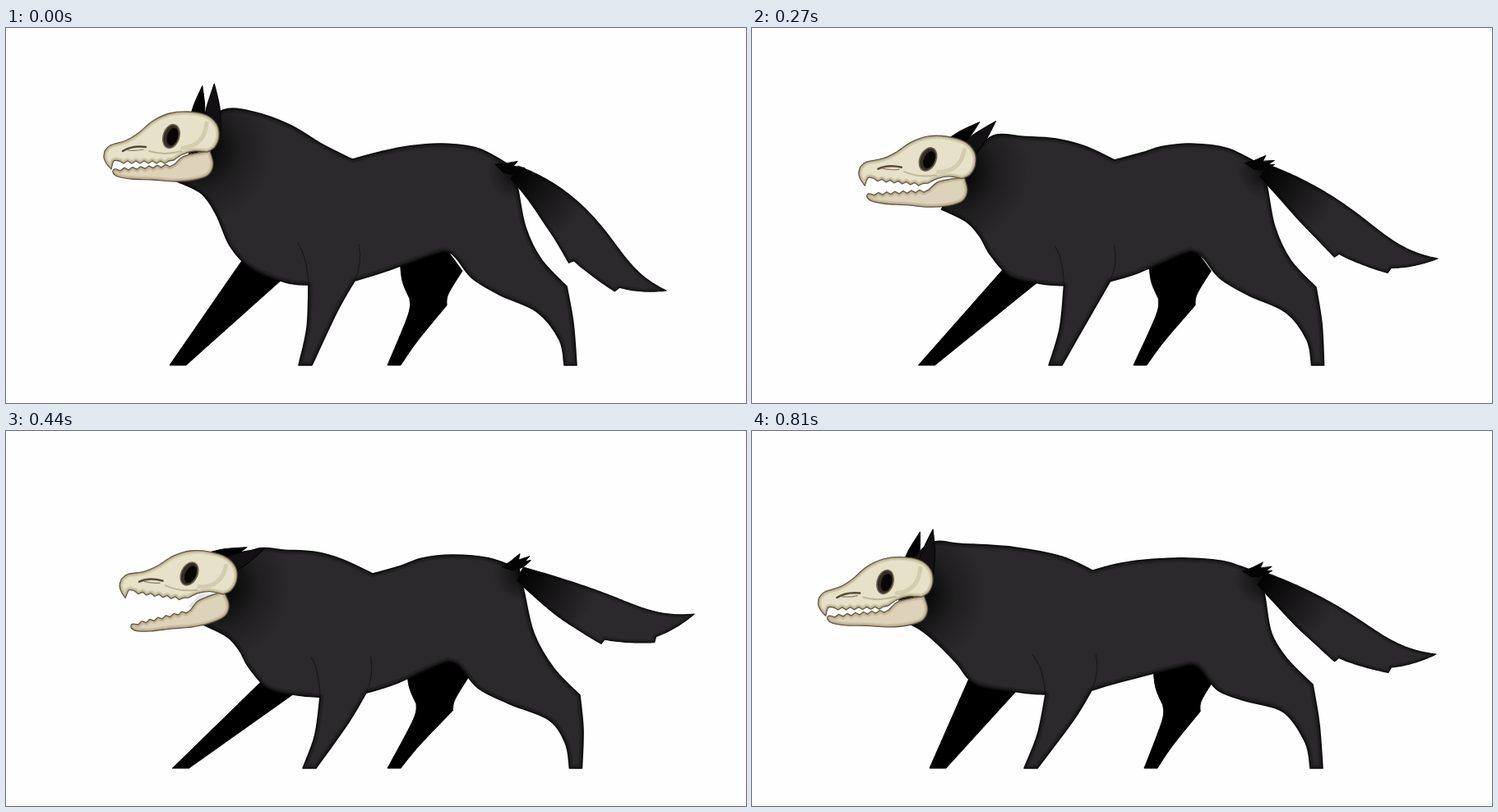
Recreate the animation shown at these times as an HTML page with a canvas. Size 900x457 px, loop 0.97 s.

```html
<!DOCTYPE html>
<html lang="en">
<head>
<meta charset="utf-8">
<title>Skull wolf walking</title>
<style>
  html, body { margin: 0; width: 100%; height: 100%; overflow: hidden; background: #fefefe; }
  canvas { display: block; width: 100vw; height: 100vh; }
</style>
</head>
<body>
<canvas id="stage" width="900" height="457"></canvas>
<script>
const ctx = document.getElementById('stage').getContext('2d');
const FUR = '#2b292b', INK = '#121012', CLEAR = 'rgba(0,0,0,0)';
const RAD = Math.PI / 180;

// Key poses. Pairs are offsets from the standing shape; angles are in degrees.
const rest = {
  until: 170, head: [0, 0], tilt: 0, jaw: 0, ear: -87, neck: [0, 0], withers: [0, 0],
  step: 0, hip: 0, hock: [0, 0], rump: [0, 0], tip: [0, 0]
};
const poses = [
  rest,
  { until: 340, head: [13, 28], tilt: 6, jaw: -5, ear: -46, neck: [30, 31], withers: [20, 1],
    step: 5, hip: 0, hock: [4, 1], rump: [4, -2], tip: [31, -39] },
  { until: 510, head: [22, 42], tilt: 8, jaw: -17, ear: -25, neck: [40, 44], withers: [25, 14],
    step: 5, hip: 10, hock: [16, 7], rump: [7, -2], tip: [34, -97] },
  { until: 680, head: [30, 38], tilt: 12, jaw: -21, ear: -14, neck: [50, 47], withers: [31, 16],
    step: 5, hip: 12, hock: [20, 11], rump: [14, 8], tip: [48, -92] },
  { until: 810, head: [-54, 44], tilt: -5, jaw: 0, ear: -56, neck: [-46, 28], withers: [-7, 10],
    step: -25, hip: 14, hock: [0, -6], rump: [-4, -2], tip: [55, -117] },
  { until: 970, head: [-39, 52], tilt: -1, jaw: 0, ear: -79, neck: [-46, 36], withers: [-7, 10],
    step: -25, hip: 14, hock: [0, -6], rump: [1, 4], tip: [29, -48] }
];

const bodyShape = `235,125 264,100 300,102 345,118 385,142 421,160
  | 455,151 490,144 530,141 575,147 617,170
  | 623,198 632,243 651,282 682,315 | 690,360 694,411 | 679,411
  | 673,380 646,346 600,325 567,305 548,281 537,273 522,275 460,297 424,308
  | 403,345 372,411 | 356,411 | 366,365 368,313
  | 340,310 296,291 272,265 256,228 238,202 208,187`;

// Bends the standing shape: every point follows the nearby joints of the pose.
function makeWarp({ neck, withers, step, hip, hock, rump }) {
  const elbow = [withers[0] / 2 + step * 0.3, withers[1] * 0.8];
  const mix = i => elbow[i] * 0.65 + neck[i] * 0.35;
  const joints = [
    [266, 100, ...neck],
    [225, 190, neck[0] * 0.75, neck[1] * 1.1],
    [285, 283, mix(0), mix(1)],
    [421, 160, ...withers],
    [368, 313, ...elbow],
    [424, 308, ...elbow],
    [364, 411, step, 0],
    [545, 141, hock[0] * 0.8, hip],
    [537, 273, hock[0] * 0.4, hip * 0.85],
    [617, 170, ...rump],
    [682, 315, ...hock],
    [686, 411, hock[0] * 0.4, 0]
  ];
  return ([x, y]) => {
    let total = 0, dx = 0, dy = 0;
    for (const [jx, jy, moveX, moveY] of joints) {
      const weight = ((x - jx) ** 2 + (y - jy) ** 2 + 4) ** -1.6;
      total += weight;
      dx += weight * moveX;
      dy += weight * moveY;
    }
    return [x + dx / total, y + dy / total];
  };
}

const points = text => text.trim().split(/\s+/).map(pair => pair.split(',').map(Number));

// Joins points by a smooth curve; "|" marks a corner.
function outline(text, place = point => point) {
  const path = new Path2D();
  let last;
  for (const part of text.split('|')) {
    const run = points(part).map(place);
    if (last) run.unshift(last);
    else path.moveTo(...run[0]);
    for (let i = 0; i < run.length - 1; i++) {
      const b = run[i], c = run[i + 1], a = run[i - 1] || b, d = run[i + 2] || c;
      path.bezierCurveTo(b[0] + (c[0] - a[0]) / 6, b[1] + (c[1] - a[1]) / 6,
        c[0] - (d[0] - b[0]) / 6, c[1] - (d[1] - b[1]) / 6, ...c);
    }
    last = run[run.length - 1];
  }
  path.closePath();
  return path;
}

function paint(path, fill, line = INK, width = 1.2) {
  ctx.fillStyle = fill;
  ctx.strokeStyle = line;
  ctx.lineWidth = width;
  ctx.fill(path);
  ctx.stroke(path);
}

// Darkens the inside of a shape softly along its edge.
function shadeEdge(path, color, reach) {
  ctx.save();
  ctx.clip(path);
  ctx.strokeStyle = color;
  for (let i = 1; i <= 4; i++) {
    ctx.lineWidth = reach * i / 2;
    ctx.stroke(path);
  }
  ctx.restore();
}

function glow(x, y, inner, outer, ...colors) {
  const gradient = ctx.createRadialGradient(x, y, inner, x, y, outer);
  colors.forEach((color, i) => gradient.addColorStop(i / (colors.length - 1), color));
  return gradient;
}

function curve(color, width, start, control, end) {
  ctx.beginPath();
  ctx.moveTo(...start);
  ctx.quadraticCurveTo(...control, ...end);
  ctx.strokeStyle = color;
  ctx.lineWidth = width;
  ctx.stroke();
}

function ellipse(x, y, rx, ry, fill) {
  ctx.beginPath();
  ctx.ellipse(x, y, rx, ry, 0.3, 0, 7);
  ctx.fillStyle = fill;
  ctx.fill();
}

// Runs a drawing in a moved and turned space.
function within(x, y, angle, drawing) {
  ctx.save();
  ctx.translate(x, y);
  ctx.rotate(angle * RAD);
  drawing();
  ctx.restore();
}

const inHead = (pose, drawing) => within(201 + pose.head[0], 132 + pose.head[1], pose.tilt, drawing);

const teeth = (x, y, slope, depth) => Array.from({ length: 13 },
  (_, i) => `${x - 5 * i},${y + slope * i + (i % 2) * depth}`).join(' | ');

const skull = outline(`-81,18 -74,11 -55,5 -40,-4 -22,-19 -2,-28 20,-30 42,-26 55,-15 58,0 53,13 44,19
  | 28,18 14,22 3,29 | ${teeth(-3, 30, 0, 3)} | -70,30 -73,40 | -79,33 -82,26 -81,18`);
const jaw = outline(`47,18 28,21 14,25 4,34 | ${teeth(-2, 37, 0.4, -3)} | -69,40 -71,44 -65,49
  -48,52 -22,53 4,55 28,53 45,47 51,34 47,18`);
const mouth = outline('46,17 | 16,23 | 4,40 | 40,40');
const ear = outline('-12,-11 14,-8 44,0 | 16,8 -12,11');

function drawEar(pose, x, y, turn, size, fill) {
  inHead(pose, () => within(x, y, pose.ear + turn - pose.tilt, () => {
    ctx.scale(size, size);
    paint(ear, fill, '#050405');
  }));
}

function drawHead(pose) {
  inHead(pose, () => {
    ctx.fillStyle = '#e2e2ec';
    ctx.fill(mouth);
    within(37, 26, pose.jaw, () => {
      ctx.translate(-37, -26);
      paint(jaw, '#ddd3ba', '#5c5240', 1.3);
      shadeEdge(jaw, 'rgba(130,112,70,.13)', 4);
    });
    paint(skull, '#e6e1c8', '#5c5240', 1.3);
    shadeEdge(skull, 'rgba(125,112,72,.14)', 4);
    curve('rgba(150,140,100,.25)', 5, [14, 14], [40, 12], [43, -16]);
    curve('rgba(130,118,82,.4)', 2, [-27, 18], [-8, 24], [12, 18]);
    curve('#574b38', 2.5, [-59, 18], [-48, 11], [-31, 13]);
    curve('#8a7c5b', 1.2, [-53, 17], [-42, 18], [-34, 16]);
    ellipse(0, 0, 10.5, 15.5, '#6f6650');
    ellipse(0, 0, 9, 14, '#352c25');
    ellipse(1.5, 0.5, 6.5, 11, '#080606');
  });
}

function drawFarLegs({ step, hip, hock }, warp) {
  const stride = Math.abs(step) * 0.68;
  paint(outline('288,282 | 199,411 | 219,411 | 335,307 | 322,285',
    point => point[1] === 411 ? [point[0] + stride, 411] : warp(point)), '#000', '#000', 1);

  const thighX = hock[0] * 0.4 + Math.abs(step) * 0.35;
  const footX = Math.max(0, -step) * 0.52;
  const follow = ([x, y]) => {
    const down = Math.max(0, (y - 330) / 81);
    return [x + thighX + (footX - thighX) * down, y + hip * 0.3 * (1 - down)];
  };
  paint(outline(`479,280 482,308 491,330 | 489,350 464,411 | 480,411 | 500,382 536,338
    | 538,324 555,296 | 536,270`, follow), '#000', '#000', 1);
}

// The tail is a swinging curve with a width that swells and tapers.
function drawTail({ rump, tip }) {
  const x = 618 + rump[0], y = 176 + rump[1];
  const endX = 803 + tip[0], endY = 320 + tip[1];
  const reach = Math.hypot(endX - x, endY - y) * 0.4;
  const swing = Math.atan2(endY - y, endX - x) / RAD;
  const leave = Math.min(32, swing * 2.2) * RAD;
  const arrive = (swing * 1.3 - 40) * RAD;
  const xs = [x, x + reach * Math.cos(leave), endX - reach * Math.cos(arrive), endX];
  const ys = [y, y + reach * Math.sin(leave), endY - reach * Math.sin(arrive), endY];
  const bezier = ([a, b, c, d], u) =>
    a * (1 - u) ** 3 + 3 * b * u * (1 - u) ** 2 + 3 * c * u * u * (1 - u) + d * u ** 3;
  const slope = ([a, b, c, d], u) =>
    (b - a) * (1 - u) ** 2 + 2 * (c - b) * u * (1 - u) + (d - c) * u * u;
  const width = u => 9 * (1 - u) + 22 * Math.sin(Math.PI * u);
  const fringe = u => [0.53, 0.79].reduce((sum, end) =>
    sum + (u < end && u > end - 0.2 ? 7 * (1 - (end - u) / 0.2) ** 2 : 0), 0);

  const shape = new Path2D();
  const addEdgePoint = (u, offset) => {
    const dx = slope(xs, u), dy = slope(ys, u), length = Math.hypot(dx, dy);
    shape.lineTo(bezier(xs, u) - dy / length * offset, bezier(ys, u) + dx / length * offset);
  };
  for (let i = 0; i <= 100; i++) addEdgePoint(i / 100, -width(i / 100));
  for (let i = 100; i >= 0; i--) addEdgePoint(i / 100, width(i / 100) + fringe(i / 100));
  shape.closePath();
  paint(shape, glow(x, y, 5, 95, '#050405', FUR));
  shadeEdge(shape, 'rgba(0,0,0,.12)', 4);

  within(x - 19, y - 11, (swing - 37) * 1.15, () => paint(
    outline('-4,1 8,0 | 23,-3 | 18,3 | 32,5 | 24,8 | 31,10 | 18,13 6,11'), '#050405', '#050405', 1));
}

function drawBody({ head, rump }, warp) {
  const shape = outline(bodyShape, warp);
  paint(shape, FUR, INK, 1.6);
  shadeEdge(shape, 'rgba(0,0,0,.12)', 5);

  ctx.save();
  ctx.clip(shape);
  ctx.fillStyle = glow(234 + head[0], 147 + head[1], 15, 90, 'rgba(0,0,0,.8)', 'rgba(0,0,0,.25)', CLEAR);
  ctx.fillRect(0, 0, 900, 457);
  ctx.fillStyle = glow(620 + rump[0], 176 + rump[1], 3, 34, 'rgba(0,0,0,.6)', CLEAR);
  ctx.fillRect(0, 0, 900, 457);
  curve('rgba(10,8,10,.5)', 1.3, ...points('368,313 366,278 355,262').map(warp));
  curve('rgba(10,8,10,.5)', 1.3, ...points('424,308 434,286 429,264').map(warp));
  ctx.restore();
}

function draw(pose) {
  const warp = makeWarp(pose);
  ctx.fillStyle = '#fefefe';
  ctx.fillRect(0, 0, 900, 457);
  drawFarLegs(pose, warp);
  drawEar(pose, 32, -25, 6, 0.84, '#000');
  drawBody(pose, warp);
  drawTail(pose);
  drawEar(pose, 50, -20, 0, 1, '#121012');
  drawHead(pose);
}

ctx.lineJoin = ctx.lineCap = 'round';
function tick() {
  const time = performance.now() % 970;
  draw(poses.find(pose => time < pose.until));
  requestAnimationFrame(tick);
}
tick();
</script>
</body>
</html>
```
